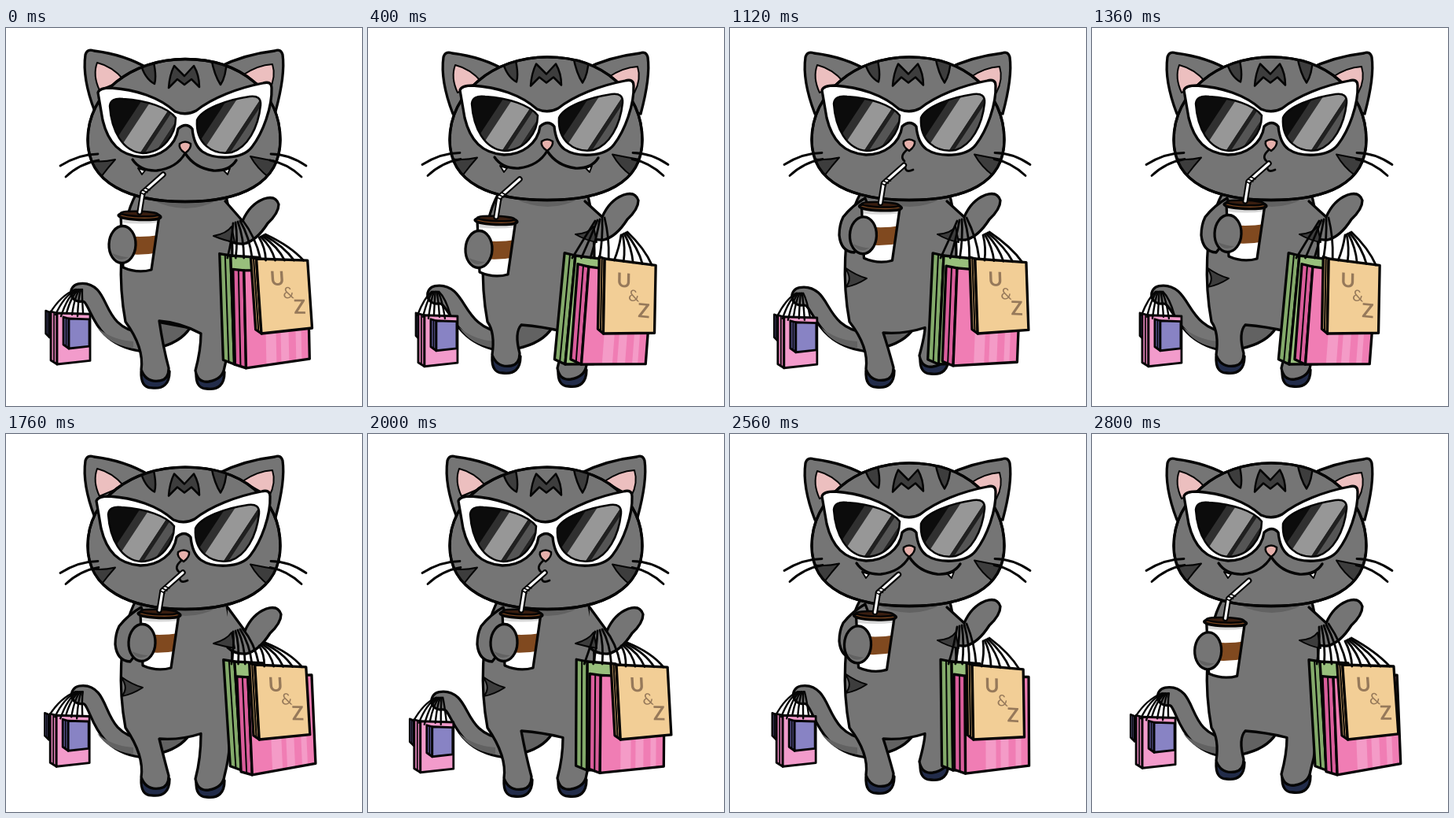
Write an HTML page with a canvas that moves like this. It is 453 by 480 pixels and loops after 2880 ms.

```html
<!DOCTYPE html>
<html lang="en">
<head>
<meta charset="utf-8">
<title>Shopping cat</title>
<style>
  html, body { margin: 0; width: 100%; height: 100%; overflow: hidden; background: #fff; }
  canvas { display: block; width: 453px; height: 480px; }
</style>
</head>
<body>
<canvas id="stage" width="453" height="480"></canvas>
<script>
const ctx = document.getElementById('stage').getContext('2d');
const STEP = 80, STEPS = 36;
const FUR = '#757575', SHADE = '#626262', STRIPE = '#3d3d3d', INK = '#050505';
const PINK = '#f07db4', BUFF = '#f2ce96', GREEN = '#98bf7c', LILAC = '#8883c4', NAVY = '#222c4a';

const mix = (a, b, k) => a + (b - a) * k;
const wave = (step, period, peak) => Math.cos((step - peak) * 2 * Math.PI / period);
const ramp = (t, from, to) => {
  const k = Math.min(1, Math.max(0, (t - from) / (to - from)));
  return k * k * (3 - 2 * k);
};

function shape(d, fill, width = 3.3) {
  const path = new Path2D(d);
  if (fill) { ctx.fillStyle = fill; ctx.fill(path); }
  if (width) { ctx.lineWidth = width; ctx.strokeStyle = INK; ctx.stroke(path); }
}
const line = (d, width) => shape(d, null, width);

function tube(d, outer, inner, color) {
  line(d, outer);
  ctx.lineWidth = inner;
  ctx.strokeStyle = color;
  ctx.stroke(new Path2D(d));
}

function oval(x, y, rx, ry, fill, width = 3.3) {
  ctx.beginPath();
  ctx.ellipse(x, y, rx, ry, .04, 0, Math.PI * 2);
  ctx.fillStyle = fill;
  ctx.fill();
  ctx.lineWidth = width;
  ctx.strokeStyle = INK;
  ctx.stroke();
}

function placed(x, y, draw, slope = 0, lean = 0) {
  ctx.save();
  ctx.transform(1, slope, lean, 1, x, y);
  draw();
  ctx.restore();
}

function clipped(d, draw) {
  ctx.save();
  ctx.clip(new Path2D(d));
  draw();
  ctx.restore();
}

// Origin at the top left corner of the front; the side panel lies to its left
function bag(w, h, side, front, panel, width = 3.3, decorate) {
  shape(`M${-side} -2L0 0V${h}L${-side} ${h - 5}Z`, panel, width);
  line(`M${-side / 2} 0V${h - 3}`, width * .6);
  const face = `M0 0L${w} ${w * .03}V${h - w * .11}L0 ${h}Z`;
  shape(face, front, 0);
  if (decorate) clipped(face, decorate);
  line(face, width);
}

function drawTail(x, y) {
  tube(`M${x} ${y + 13}C${x + 30} ${y + 8} 108 389 172 399`, 26, 19.5, FUR);
  shape('M116 380Q130 402 162 407L162 398Q134 396 116 380', SHADE, 0);
}

function drawTailBags(x, y, u) {
  placed(-4 * u, y - 323, () => {
    placed(60 - 2 * u, 361, () => bag(1, 32, 5, '#6a68a6', '#6a68a6', 2.5));
    placed(68, 362, () => bag(42, 65, 8, '#f29bcb', '#de80b5', 2.8));
    placed(83, 369, () => bag(26, 38, 7, LILAC, '#625ea0', 2.8));
  });
  for (let i = 0; i < 7; i++) {
    const end = 59 + i * 7 - 4 * u;
    line(`M${x - 6 + i * 1.5} ${y + 9}Q${mix(x, end, .65)} ${y + 17} ${end} ${y + 39 + i % 3 * 2}`, 2.4);
  }
}

function drawBody(step, bob, raised) {
  const sway = wave(step, 6, 3);
  const lift = peak => Math.max(0, wave(step, 6, peak)) ** 4;
  const lx = 191 - 15 * lift(5), ly = 447 + 2 * bob - 18 * lift(5);
  const rx = 260, ry = 447 + 3 * bob - 16 * lift(2);
  const hipL = 382 + 10 * sway, hipR = 383 - 5 * sway;

  shape(`M186 372L234 381Q222 400 190 407Z`, SHADE);
  for (const [x, y] of [[lx, ly], [rx, ry]])
    shape(`M${x - 18} ${y - 10}Q${x - 19} ${y + 11} ${x - 5} ${y + 11}Q${x + 18} ${y + 14} ${x + 18} ${y - 10}Z`, NAVY);
  shape(`M166 210C141 255 144 330 152 373Q${lx - 14} ${ly - 40} ${lx - 18} ${ly - 12}
    Q${lx - 12} ${ly + 5} ${lx + 6} ${ly + 2}Q${lx + 17} ${ly} ${lx + 17} ${ly - 14}Q${lx + 10} ${ly - 40} 195 ${hipL}
    Q222 ${hipL + 2} 248 ${hipR}Q${rx - 12} ${ry - 38} ${rx - 19} ${ry - 12}
    Q${rx - 16} ${ry + 4} ${rx - 2} ${ry + 2}Q${rx + 16} ${ry - 1} ${rx + 18} ${ry - 16}Q288 395 284 360C290 310 290 250 279 210Z`, FUR);
  shape(`M185 ${218 + bob * 2}Q230 ${240 + bob * 2} 270 ${218 + bob * 2}Z`, SHADE, 0);
  if (raised) placed(0, 2 + 2 * bob, () => {
    shape('M146 304Q160 314 174 318Q160 327 147 329Q157 319 146 304', STRIPE, 2);
    shape('M172 216Q156 225 144 240Q139 250 139 263Q141 284 158 285L185 250Z', FUR);
  });
}

function drawBagArm(bob) {
  placed(bob * 3, bob * 5, () => shape(`M279 ${220 - bob * 5}L301 245Q310 224 328 217Q343 212 347 224
    Q347 235 333 248Q319 270 303 274Q288 275 279 266`, FUR));
  shape(`M264 ${264 + bob * 2}Q281 261 287 252L291 272Q278 270 264 ${264 + bob * 2}`, STRIPE, 2);
}

function drawBags(step, bob) {
  const u = (wave(step, 12, 10.3) + 1) / 2, v = (wave(step, 12, 11.4) + 1) / 2;
  const greenX = mix(263, 291, u), pinkX = mix(280, 308, u), buffX = mix(301, 319, v);

  placed(greenX, 289, () => bag(36, 138, 14, GREEN, '#83aa6a'), mix(.1, .02, u), mix(-.1, .065, u));
  placed(pinkX, mix(303, 309, u), () => bag(81, 124, 14, PINK, '#d95d9b', 3.3, () => {
    for (let i = 0; i < 3; i++)
      shape(`M${26 + i * 19} 0h${13 - i * 3}v130h${i * 3 - 13}Z`, '#f49bc7', 0);
  }), mix(.11, -.07, u), mix(-.08, .045, u));

  placed(buffX, 293, () => {
    bag(65, 95, 7, BUFF, '#c99f68');
    ctx.fillStyle = '#96795a';
    ctx.textAlign = 'center';
    ctx.textBaseline = 'middle';
    [...'U&Z'].forEach((letter, i) => {
      ctx.font = i === 1 ? '20px Lato, sans-serif' : 'bold 25px Lato, sans-serif';
      ctx.fillText(letter, 25 + 13 * i, 26 + 18 * i);
    });
  }, mix(.1, 0, v), mix(-.02, .07, v));

  const strap = (x, y, toX, toY) =>
    line(`M${x} ${y + bob * 3}Q${mix(x, toX, .6) + 3} ${mix(y, toY, .45)} ${toX} ${toY}`, 2.8);
  for (let i = 0; i < 5; i++) {
    strap(289 + i * 3, 248 - i, mix(greenX - 4, buffX + 5, i / 4), 292);
    strap(322 + i * 2, 266 - i, buffX + 12 + i * 12, 295 + i * 1.5 * (1 - v));
  }
}

function drawCup(x, y) {
  placed(x, y, () => {
    const cup = 'M-24 1L-21 67Q-3 75 15 70L25 1Z';
    shape(cup, '#fff', 0);
    clipped(cup, () => {
      shape('M-30 25Q0 31 30 25V47Q0 54 -30 48Z', '#80491f', 0);
      shape('M-24 4H26L24 10Q0 13 -24 10Z', '#d8d8d8', 0);
    });
    line(cup);
    oval(0, 2, 27, 4.5, '#7a4520');
    oval(0, -1, 24, 3.2, '#3a1e10', 2.5);
    tube('M0 -3L4 -28L30 -51', 7.4, 3.2, '#fff');
    for (let i = 0; i < 3; i++) line(`M${1 + i * 3} ${-28 - i * 3}l6 3`, 1.5);
    oval(-22, 38, 17, 23.5, FUR);
    shape('M-35 49Q-27 62 -14 54Q-23 54 -35 49', SHADE, 0);
  });
}

function drawLens(d, x) {
  shape(d, '#0c0c0c', 0);
  clipped(d, () => {
    const band = (left, width, color) => shape(`M${x + left + 38} 75h${width}l-64 97h${-width}Z`, color, 0);
    band(-14, 12, '#303030');
    band(-2, 30, '#979797');
    band(28, 6, '#202020');
    band(34, 13, '#555');
    band(47, 40, '#242424');
  });
  line(d, 2.5);
}

function drawGlasses() {
  shape(`M117 82Q119 76 133 76C165 78 195 88 215 106Q229 112 242 105C262 89 295 76 327 70
    Q338 67 338 76C339 100 327 133 313 151C300 168 265 167 250 157Q239 149 237 128
    Q229 119 219 128C216 150 196 164 173 164C145 162 130 146 123 117Z`, '#fff');
  drawLens('M132 99Q133 88 149 90C180 92 206 101 216 114C216 136 200 158 174 159C148 157 134 130 132 99Z', 160);
  drawLens('M243 117C249 103 281 91 310 87Q325 85 324 98C321 127 307 152 287 158C262 162 241 146 243 117Z', 268);
}

function drawMouth(drinking) {
  if (drinking) {
    line('M226 157Q215 166 222 172M223 177Q222 188 233 183', 2.8);
  } else {
    shape('M168 178L173 186L177 181ZM277 181L282 186L285 178Z', '#fff', 2);
    line('M161 167Q171 182 192 181Q217 178 228 159Q240 178 264 181Q284 182 293 168');
  }
  shape('M221 147Q228 142 235 147Q236 153 228 159Q219 153 221 147Z', '#e6b0ab', 2.5);
}

function drawHead(bob, drinking) {
  const top = 39.5 + 2.7 * bob, chin = 220.5 + 2 * bob, rise = Math.max(0, -bob);

  placed(-5 * rise, 3 * rise, () => {
    shape('M113 106C103 80 98 55 101 34Q103 26 112 29C137 32 160 39 182 52L160 90Z', FUR);
    shape('M116 44Q110 60 119 79L150 66Q136 49 116 44Z', '#ecbfbf', 2);
  });
  placed(4 * rise - 2, 3 * rise, () => {
    shape('M345 106C352 80 357 55 354 34Q352 26 344 29C318 32 294 39 272 50L290 90Z', FUR);
    shape('M341 46Q346 62 337 79L303 60Q322 47 341 46Z', '#ecbfbf', 2);
  });

  const skull = `M228 ${top}C300 ${top} 349 82 349 142C349 198 298 ${chin} 228 ${chin}
    C158 ${chin} 104 198 104 142C104 82 160 ${top} 228 ${top}Z`;
  shape(skull, FUR);
  clipped(skull, () => placed(0, bob * 2.5, () => {
    shape('M171 44Q176 64 189 71Q192 60 187 40Z', STRIPE, 2.5);
    shape('M261 38Q265 60 273 72Q280 62 281 40Z', STRIPE, 2.5);
    shape('M207 76Q208 60 214 48L227 61L239 48Q246 60 246 75L236 65L227 72L218 65Z', STRIPE, 2.5);
    shape('M100 167Q118 172 139 167Q130 177 121 189H100Z', STRIPE, 2);
    shape('M356 171Q335 168 311 163Q320 179 335 190Z', STRIPE, 2);
  }));
  line(skull);

  placed(0, bob * 1.5, () => line(`M117 160Q93 160 69 175M118 168Q94 172 76 189
    M337 160Q360 160 382 175M336 168Q358 172 376 189`, 2.8));

  placed(-Math.max(0, bob) * 2, bob * 3, () => {
    drawMouth(drinking);
    drawGlasses();
  });
}

function draw(step) {
  const bob = Math.round(Math.sin(step * 2 * Math.PI / 3) * 1.1);
  const sip = ramp(step, 10, 15) * (1 - ramp(step, 30, 35));
  const drift = wave(step > STEPS / 2 ? step - STEPS : step, 20, 0);
  const cupX = mix(163 + 7 * drift, 195, sip);
  const cupY = mix(243 - 6 * drift, 225 + 2 * bob, sip);
  const pull = wave(step, 12, 10.6);
  const tailX = 91 + 4 * pull, tailY = 323 - 5.5 * wave(step, 12, 9);

  ctx.fillStyle = '#fff';
  ctx.fillRect(0, 0, 453, 480);
  ctx.lineJoin = ctx.lineCap = 'round';

  drawTail(tailX, tailY);
  drawTailBags(tailX, tailY, pull);
  drawBody(step, bob, sip > .5);
  drawBagArm(bob);
  drawBags(step, bob);
  drawHead(bob, sip > .8);
  drawCup(cupX, cupY);
}

function tick() {
  draw(Math.floor(performance.now() / STEP) % STEPS);
  requestAnimationFrame(tick);
}
tick();
</script>
</body>
</html>
```
